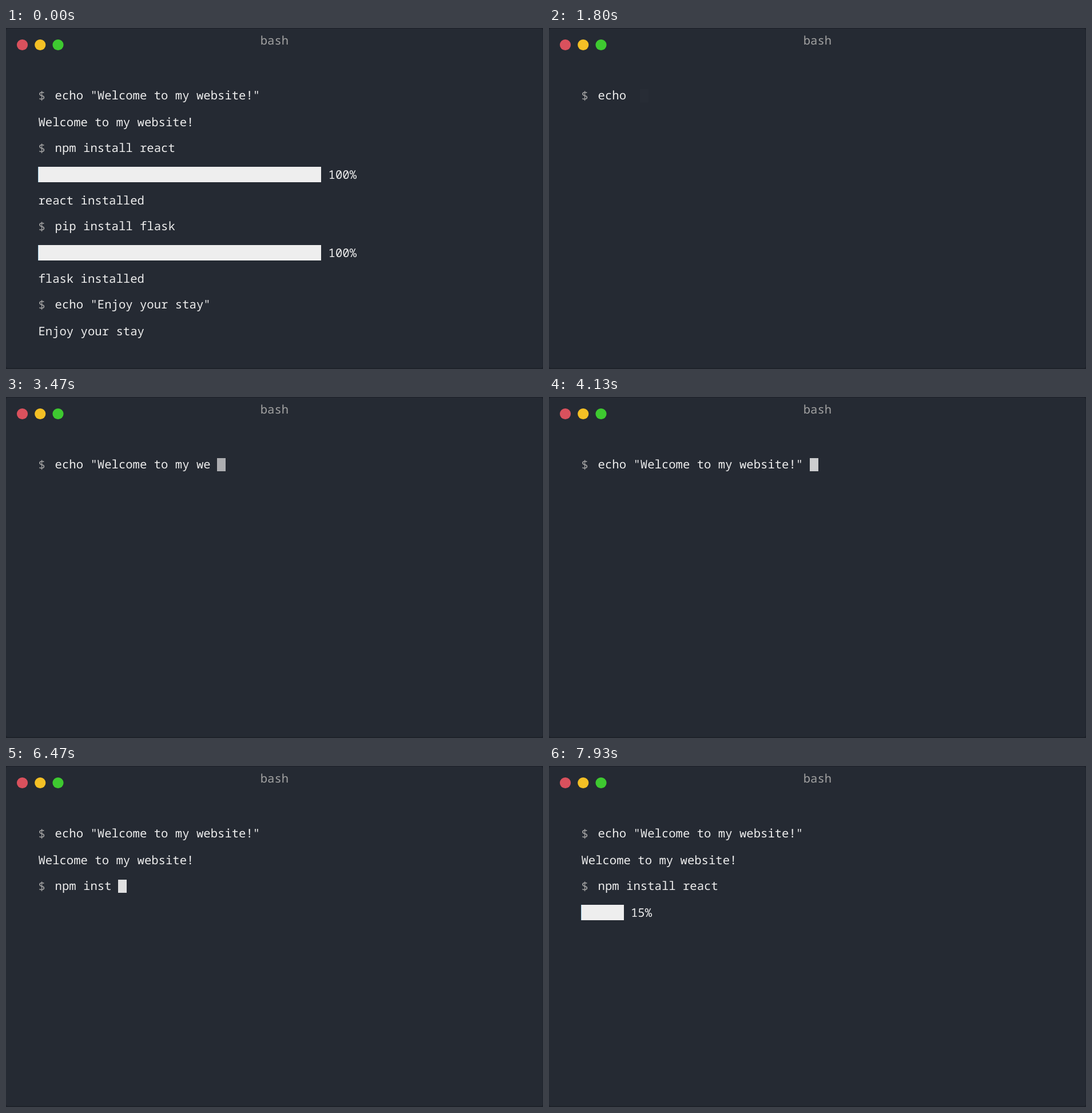
Animation, 939 px wide and 597 px high, one loop 8 s. Source, as an HTML page with a canvas:

```html
<!DOCTYPE html>
<html lang="en">
<head>
<meta charset="utf-8">
<title>Terminal</title>
<style>
  html, body { margin: 0; width: 100%; height: 100%; overflow: hidden; background: #252a33; }
  canvas { display: block; }
</style>
</head>
<body>
<canvas id="stage" width="939" height="597"></canvas>
<script>
const ctx = document.getElementById('stage').getContext('2d');

const LOOP = 8000;
const TYPE_DELAY = 96;
const COL = 12.37;      // advance of one monospace cell
const LEFT = 56.4;
const INPUT_LEFT = 85.6;
const BAR_CELLS = 40;
const BG = '#252a33', EDGE = '#1c2028', TEXT = '#eeeeee', MUTED = '#a2a2a2';

const GREETING = 'echo "Welcome to my website!"';
const INSTALL = 'npm install react';

function setFont() {
  ctx.font = '20.617px "Noto Sans Mono", "DejaVu Sans Mono", monospace';
  ctx.textRendering = 'geometricPrecision';
  ctx.textBaseline = 'alphabetic';
}

function write(str, x, y, color = TEXT) {
  ctx.fillStyle = color;
  ctx.fillText(str, x, y);
}

// CSS "ease": cubic-bezier(.25, .1, .25, 1)
function ease(x) {
  const bezier = (a, b, u) => 3 * a * u * (1 - u) ** 2 + 3 * b * u * u * (1 - u) + u ** 3;
  let lo = 0, hi = 1;
  for (let i = 0; i < 24; i++) {
    const mid = (lo + hi) / 2;
    if (bezier(0.25, 0.25, mid) < x) lo = mid; else hi = mid;
  }
  return bezier(0.1, 1, lo);
}

// One-second blink, fully hidden halfway through
function blink(ms) {
  const p = (ms % 1000) / 1000;
  return p < 0.5 ? 1 - ease(p * 2) : ease(p * 2 - 1);
}

function input(str, y) {
  write('$', LEFT, y + 1, MUTED);
  write(str, INPUT_LEFT, y);
}

function cursor(cells, y, opacity) {
  ctx.globalAlpha = opacity;
  ctx.fillStyle = TEXT;
  ctx.fillRect(Math.round(INPUT_LEFT + cells * COL + 11.25), y - 18, 15, 23);
  ctx.globalAlpha = 1;
}

const typed = (t, start, max) =>
  Math.max(0, Math.min(max, Math.floor((t - start) / TYPE_DELAY)));

function typing(str, y, t, start, blinkStart) {
  const n = typed(t, start, str.length);
  input(str.slice(0, n), y);
  cursor(n, y, blink(t - blinkStart));
}

function progress(cells, y) {
  if (!cells) return;
  const right = Math.round(LEFT + cells * COL);
  ctx.fillStyle = TEXT;
  ctx.fillRect(56, y - 21, right - 56, 27);
  ctx.fillStyle = '#a9d3ea';
  ctx.fillRect(56, y - 21, 1, 27);
  write(Math.round(cells / BAR_CELLS * 100) + '%', LEFT + (cells + 1) * COL, y);
}

function frame() {
  ctx.fillStyle = EDGE;
  ctx.fillRect(0, 0, 939, 597);
  ctx.fillStyle = BG;
  ctx.beginPath();
  ctx.roundRect(0, 1, 938.5, 594.5, 4);
  ctx.fill();
  ['#d9515d', '#f4c025', '#3ec930'].forEach((color, i) => {
    ctx.fillStyle = color;
    ctx.beginPath();
    ctx.arc(28.5 + i * 31.25, 29.5, 9.6, 0, Math.PI * 2);
    ctx.fill();
  });
  write('bash', 444.75, 29, MUTED);
}

function finished() {
  input(GREETING, 125);
  write('Welcome to my website!', LEFT, 172);
  input(INSTALL, 217);
  progress(BAR_CELLS, 264);
  write('react installed', LEFT, 309);
  input('pip install flask', 354);
  progress(BAR_CELLS, 401);
  write('flask installed', LEFT, 446);
  input('echo "Enjoy your stay"', 491);
  write('Enjoy your stay', LEFT, 538);
}

function session(t) {
  if (t < 1395) return;
  if (t < 5590) {
    typing(GREETING, 125, t, 1310, 1365);
    return;
  }
  input(GREETING, 125);
  write('Welcome to my website!', LEFT, 172);
  if (t < 5660) return;
  if (t < 7335) {
    typing(INSTALL, 217, t, 5615, 5635);
    return;
  }
  input(INSTALL, 217);
  progress(typed(t, 7335, BAR_CELLS), 264);
}

function draw(t) {
  setFont();
  frame();
  if (t < 798) finished(); else session(t);
}

const origin = performance.now();
function tick() {
  draw((performance.now() - origin) % LOOP);
  requestAnimationFrame(tick);
}
tick();
</script>
</body>
</html>
```
